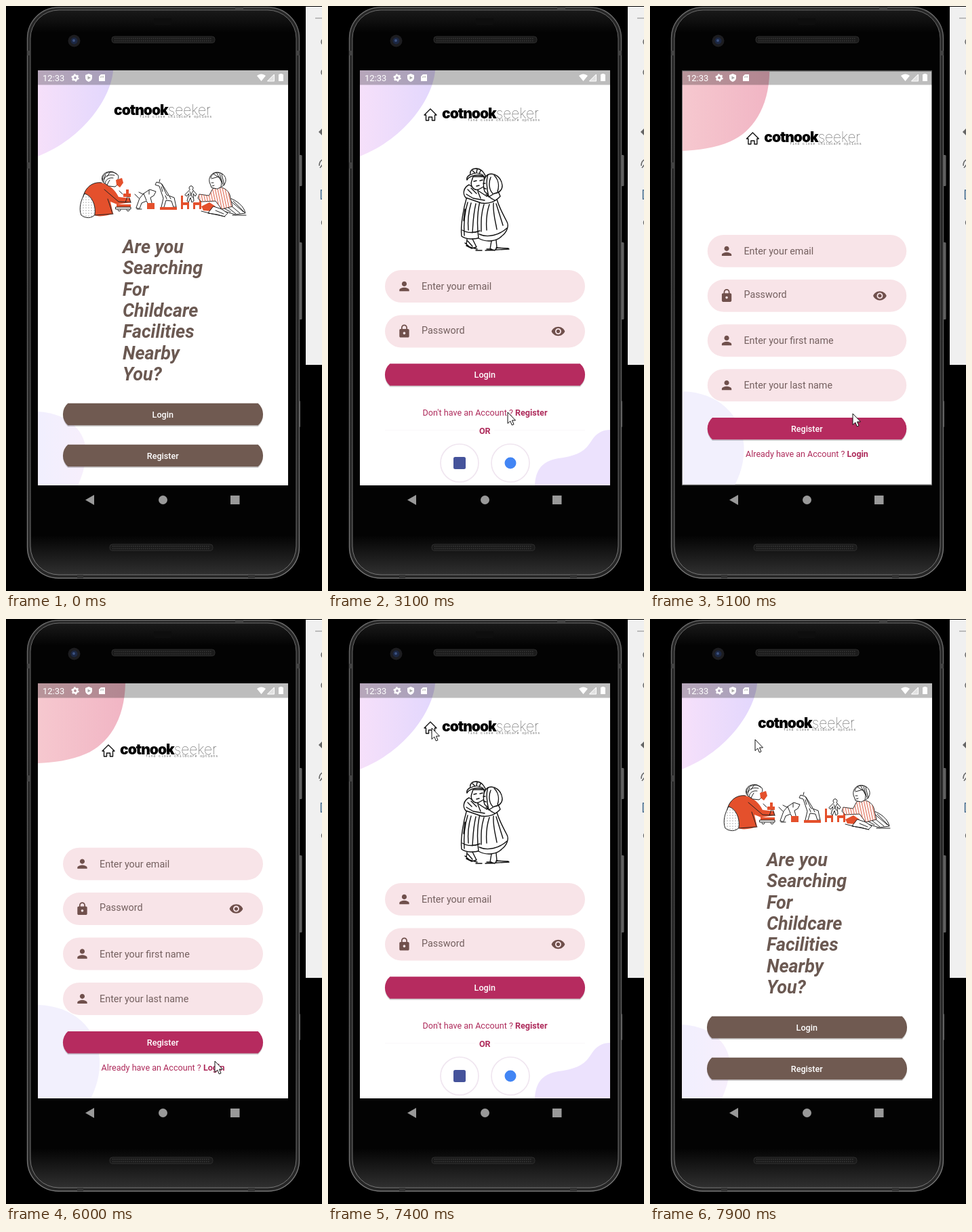
An HTML page that plays this animation: 466x864 px, repeating every 8000 ms.

```html
<!DOCTYPE html>
<html lang="en">
<head>
<meta charset="utf-8">
<title>Childcare app walkthrough</title>
<style>
html, body { margin: 0; width: 100%; height: 100%; overflow: hidden; background: #000; }
svg { display: block; width: 466px; height: 864px; font-family: Roboto, sans-serif; }
.mid { text-anchor: middle; font-size: 12.6px; }
.btn { fill: #fff; font-weight: 500; }
.link { fill: #ae2b5b; }
.hint { font-size: 14.4px; fill: #74605f; }
.icon { fill: #70504c; }
.head { font: italic 700 26.95px Roboto, sans-serif; fill: #6b5952; }
.logo { font: 900 21px Inter, sans-serif; letter-spacing: -1px; }
.logo .thin { font-weight: 100; letter-spacing: 0; fill: #444; }
.tag { font: 5px "Liberation Mono", monospace; letter-spacing: .82px; fill: #666; }
.ink { fill: none; stroke: #222; stroke-linecap: round; stroke-linejoin: round; }
.bold .ink { stroke: #111; stroke-width: 1.4; }
.ink.paper { fill: #fff; }
.red { fill: #e4502c; }
</style>
</head>
<body>
<svg id="stage" viewBox="0 0 466 864"></svg>
<script>
const ICONS = {
  person: 'M12 12c2.21 0 4-1.79 4-4s-1.79-4-4-4-4 1.79-4 4 1.79 4 4 4zm0 2c-2.67 0-8 1.34-8 4v2h16v-2c0-2.66-5.33-4-8-4z',
  lock: 'M18 8h-1V6c0-2.76-2.24-5-5-5S7 3.24 7 6v2H6c-1.1 0-2 .9-2 2v10c0 1.1.9 2 2 2h12c1.1 0 2-.9 2-2V10c0-1.1-.9-2-2-2zm-6 9c-1.1 0-2-.9-2-2s.9-2 2-2 2 .9 2 2-.9 2-2 2zm3.1-9H8.9V6c0-1.71 1.39-3.1 3.1-3.1s3.1 1.39 3.1 3.1v2z',
  eye: 'M12 4.5C7 4.5 2.73 7.61 1 12c1.73 4.39 6 7.5 11 7.5s9.27-3.11 11-7.5c-1.73-4.39-6-7.5-11-7.5zM12 17c-2.76 0-5-2.24-5-5s2.24-5 5-5 5 2.24 5 5-2.24 5-5 5zm0-8c-1.66 0-3 1.34-3 3s1.34 3 3 3 3-1.34 3-3-1.34-3-3-3z'
};

const path = (d, attrs = '') => `<path d="${d}" ${attrs}/>`;
const rect = (x, y, w, h, fill, attrs = '') =>
  `<rect x="${x}" y="${y}" width="${w}" height="${h}" fill="${fill}" ${attrs}/>`;
const circle = (x, y, r, fill, attrs = '') => `<circle cx="${x}" cy="${y}" r="${r}" fill="${fill}" ${attrs}/>`;
const text = (x, y, cls, str) => `<text x="${x}" y="${y}" class="${cls}">${str}</text>`;
const icon = (name, x, y) =>
  path(ICONS[name], `class="icon" transform="translate(${x - 10.8} ${y - 10.8}) scale(.898)"`);

const ink = d => path(d, 'class="ink"');
const shape = d => path(d, 'class="ink paper"');
const red = d => path(d, 'class="red"');
const filled = (d, pattern) => shape(d) + path(d, `fill="url(#${pattern})"`);

// A bar whose ends are arcs of a taller pill
const button = (mid, fill, label) => {
  const bar = (y, attrs) => path(`M91.3 ${y}H371.7A21.5 21.5 0 0 1 371.7 ${y + 32.4}H91.3A21.5 21.5 0 0 1 91.3 ${y}Z`, attrs);
  return bar(mid - 14.4, 'opacity=".2"') + bar(mid - 16.2, `fill="${fill}"`) +
    text(231.3, mid + 4.5, 'mid btn', label);
};

const field = (y, label) => {
  const secret = label === 'Password', mid = y + 24;
  return rect(84, y, 295, 48, '#f8e4e8', 'rx="24"') + icon(secret ? 'lock' : 'person', 112.5, mid) +
    text(138, mid + (secret ? 3 : 5), 'hint', label) + (secret ? icon('eye', 339.5, mid) : '');
};

const logo = (x, y) =>
  text(x, y, 'logo', 'cotnook<tspan class="thin">seeker</tspan>') +
  text(x + 38, y + 3.6, 'tag', 'find close childcare options');

const homeLogo = dy => `<g transform="translate(0 ${dy})">` +
  path('M142 161L151 152L160 161H157.5V169H153.5V164H148.5V169H144.5V161Z',
    'fill="#fff" stroke="#111" stroke-width="1.4" stroke-linejoin="round"') +
  logo(168, 166) + '</g>';

const footer = (y, question, action) =>
  text(231.5, y, 'mid link', `${question} <tspan font-weight="700">${action}</tspan>`);

const lilacCorner = path('M47 95H158C155 135 115 195 47 222Z', 'fill="url(#lilac)"');

// Two children at play with a row of toys
const playing =
  red('M141 261C129 259 117 267 114 281C126 282 131 292 128 308C137 313 150 309 158 307L154 289L164 293L184 290L183 284L166 282C160 270 153 265 141 261Z') +
  filled('M116 277C110 287 107 300 111 309C117 314 127 314 131 308C133 295 127 280 116 277Z', 'dots') +
  ink('M141 261C129 259 117 267 114 281M145 271L166 289L184 290M131 309L158 307M150 285L157 306') +
  shape('M143 260C140 248 150 244 159 246C167 248 167 254 164 257L166 262L161 267L152 266Z') +
  ink('M142 258C139 249 148 243 158 245L164 249M144 260C144 252 150 248 160 250M146 262C147 256 152 253 158 254M149 264L153 257M147 249L144 256M153 246L149 252') +
  red('M162 257L171 254L173 261L168 268L163 264Z') +
  red('M163 293H184V297H163ZM173 277H184V282H173ZM177 271H181V277H177Z') +
  shape('M162 297H184V300H162Z') + ink('M165 301A2 2 0 1 0 169 301M178 301A2 2 0 1 0 182 301M179 282L176 290M181 282L184 290M172 278L167 273') +
  shape('M192 298L197 284L203 277L212 271L221 274L218 280L213 283L217 298H213L207 288L200 291L197 299Z') +
  ink('M190 278L196 284M203 277L207 287M196 275L202 278M211 272V278M193 300H200') +
  red('M208 291H219V300H208Z') +
  shape('M229 297L232 284L226 266L220 264L222 260L229 262L237 279L248 283L251 297H247L244 288L236 287L233 297Z') +
  ink('M226 260L227 256M229 267L231 274M235 280L237 285M241 281L243 285M230 263L240 279') +
  red('M227 297H252V301H227Z') +
  red('M258 280H261V290H270V300H267V294H261V300H258ZM276 290H285V280H288V300H285V294H279V300H276Z') +
  shape('M271 271A3 3 0 1 1 275 271L281 278L279 281L276 277L277 288L274 290L272 283L269 290L267 288L270 277L266 281L264 279Z') +
  ink('M271 274L275 283M276 273L271 281') +
  shape('M328 283C341 287 351 296 353 306L338 308L318 302L314 292Z') +
  ink('M330 287L350 304M327 291L345 306M335 288L352 305M323 294L339 307M334 309H354M320 298L331 304') +
  filled('M305 270C314 265 326 268 330 279L334 296L318 300L309 288L288 289L283 284L285 278L299 280Z', 'stripes') +
  shape('M303 268L300 260C298 250 307 244 314 246C324 248 327 258 321 265L312 270Z') +
  ink('M302 254C303 246 313 243 320 249M303 255L314 252C317 256 319 261 317 266M318 249L322 264M315 248L320 264M311 247L318 260M306 248L315 254M303 261H306M304 266L307 265') +
  red('M288 296L300 290L309 296L304 303L291 302Z') +
  shape('M306 296L318 300L327 306L322 311L312 308L298 306Z') + ink('M299 306L323 311M288 303L300 306M309 302L321 307');

// Two children in bonnets hugging
const hugging = '<g class="bold">' +
  shape('M205 281C200 298 195 324 197 340C204 345 217 345 224 342L226 286Z') +
  shape('M224 288C220 306 220 328 222 343C234 350 250 347 256 340C264 334 267 325 264 319C256 304 251 294 249 285Z') +
  shape('M208 264C200 268 198 277 203 283L226 291C238 293 248 288 254 281L251 274L234 281Z') +
  shape('M212 258C209 266 215 273 222 271L231 266L230 252L214 252Z') +
  shape('M205 257C208 251 222 246 234 254C229 245 227 241 219 240C211 240 209 245 210 249C206 251 204 254 205 257Z') +
  ink('M211 249C216 246 223 246 229 250M213 243L217 247M220 241L219 246M225 243L223 248M215 259L219 258M224 258L228 257M219 266L223 265') +
  shape('M236 249C229 253 228 265 231 274L238 280C236 268 239 260 250 255Z') +
  shape('M236 249C246 245 256 254 257 265C257 273 251 276 245 277L237 282C234 270 233 256 236 249Z') +
  ink('M240 253C236 262 238 272 243 277M245 250C251 256 253 265 250 274M229 262L232 262M230 269L233 270') +
  ink('M204 278L214 284L231 287M233 278L242 285M206 271L212 277M211 269L219 277M221 274L225 284M239 283L246 287') +
  ink('M206 290C201 306 200 323 201 339M211 291C206 308 206 320 207 331M218 292C214 309 214 320 213 335M198 331C206 336 217 335 224 332M202 300L200 317') +
  ink('M230 293C225 310 226 320 226 333M238 293C233 308 233 319 234 331M244 291C243 306 247 318 249 330M248 292L258 324M223 337C236 343 253 338 264 328') +
  ink('M205 344L204 354L212 358L219 356L213 344M241 347L239 359L246 361L249 357L248 346M202 350L209 356L220 359M234 359H241M206 347L213 355M218 361H227M232 361L267 359M248 357L266 358') +
  '</g>';

const landing =
  lilacCorner + path('M47 599C95 602 118 630 118 660C117 680 112 695 106 708H47Z', 'fill="url(#mist)"') +
  logo(159, 161) + playing +
  ['Are you', 'Searching', 'For', 'Childcare', 'Facilities', 'Nearby', 'You?']
    .map((line, i) => text(172, 365 + 31.35 * i, 'head', line)).join('') +
  button(603, '#705a51', 'Login') + button(664, '#705a51', 'Register');

const login =
  lilacCorner +
  path('M305 708C306 690 312 672 340 668C372 664 380 655 388 643C396 630 405 626 416 626V708Z', 'fill="#ece2fd"') +
  homeLogo(0) + hugging + field(390, 'Enter your email') + field(456.5, 'Password') +
  button(544.5, '#b62b5f', 'Login') + footer(605, "Don't have an Account ?", 'Register') +
  rect(84, 626, 134, 1, '#faf8fa') + rect(245, 626, 134, 1, '#faf8fa') +
  text(231.3, 631.5, 'mid link', '<tspan font-weight="700">OR</tspan>') +
  [194, 269].map(x => circle(x, 675, 28, '#fff', 'stroke="#f0e6f0" stroke-width="1.7"')).join('') +
  rect(185, 666, 18, 18, '#45539b', 'rx="2.5"') + circle(269, 675, 8.5, '#4285f4');

const register =
  path('M47 95H176C175 150 150 185 118 199C95 209 70 212 47 213Z', 'fill="url(#rose)"') +
  path('M47 570C100 571 134 605 138 650C139 675 132 694 125 708H47Z', 'fill="#f2f0fd"') +
  homeLogo(34) +
  ['Enter your email', 'Password', 'Enter your first name', 'Enter your last name']
    .map((label, i) => field(337.7 + 66.4 * i, label)).join('') +
  button(625.3, '#b62b5f', 'Register') + footer(667, 'Already have an Account ?', 'Login');

const statusBar =
  rect(47, 95, 369, 21.5, '#000', 'opacity=".26"') +
  `<g fill="#fff"><text x="54" y="111" font-size="13">12:33</text>` +
  circle(102, 106, 3.2, 'none', 'stroke="#fff" stroke-width="2.6"') +
  circle(102, 106, 4.9, 'none', 'stroke="#fff" stroke-width="1.6" stroke-dasharray="2.4 2.73"') +
  path('M122 100L127 102V106C127 109 125 111 122 112C119 111 117 109 117 106V102Z') +
  path('M120.5 103.5L125 106L120.5 108.5Z', 'fill="#aaa"') +
  path('M140 101H146V111H137V104Z') + path('M139.5 104V106M141.5 103V106M143.5 103V106', 'stroke="#bbb"') +
  path('M370 103C374 99.5 379 99.5 383 103L376.5 111Z') +
  path('M395 101V111H385Z', 'opacity=".55"') + path('M395.5 101V111H385.5Z', 'fill="none" stroke="#fff"') +
  path('M403.5 100H407.5V101H409V111H402V101H403.5Z') + '</g>';

const speaker = (x, y, w) => rect(x, y, w, 9.5, '#1b1b1b', 'rx="4" stroke="#2d2d2d"') +
  path(`M${x + 4} ${y + 3}H${x + w - 4}M${x + 4} ${y + 6.5}H${x + w - 4}`, 'stroke="#3a3a3a" stroke-width="1.5" stroke-dasharray="1.5 1.5"');

const phone =
  [[220, 46], [349, 114], [583, 39]].map(([y, h]) => rect(432, y, h === 39 ? 2 : 4.5, h, '#606060', 'rx="1.5"')).join('') +
  rect(31.5, 2, 401, 843, '#262626', 'rx="46" stroke="url(#rim)" stroke-width="1.4"') +
  rect(36, 6, 392, 834, 'url(#body)', 'rx="42" stroke="url(#rim)"') +
  rect(31, 66, 5, 7, '#444') + rect(31, 231, 5, 9, '#444') + rect(428, 66, 5, 7, '#444') +
  rect(338, 1, 12, 5, '#444') + rect(105, 840, 9, 5, '#333') + rect(357, 840, 10, 5, '#333') +
  rect(218, 18, 26, 10, '#0e0e0e', 'rx="2"') +
  circle(100.5, 51.5, 9, '#1d1d20') + circle(100.5, 51.5, 5, '#1c2742') + circle(100, 51, 2, '#3c5280') +
  speaker(156, 45, 152) + speaker(153, 795, 152) +
  `<g fill="#999">${path('M117 729.5L130 722V737Z')}<circle cx="231.5" cy="729.5" r="6.5"/>${rect(331, 723, 13.5, 13, '#999')}</g>`;

const toolbar = rect(442, 1, 24, 529, '#f0f0f0') +
  `<g fill="none" stroke="#666" stroke-width="1.5">` +
  path('M456 18H466', 'stroke="#aaa"') + circle(470, 53, 5, 'none') + circle(470, 98, 5, 'none') +
  path('M467 181L462 186L467 191Z', 'fill="#666"') + path('M462 236C462 231 464 228 467 227M463 239L467 234') +
  rect(464.5, 272, 8, 13, '#c9d8e6', 'stroke="#4a6d8c"') + circle(470, 320, 4.5, 'none') + '</g>';

const gradient = (id, dir, ...stops) => `<linearGradient id="${id}" ${dir}>` +
  stops.map(([offset, color]) => `<stop offset="${offset}" stop-color="${color}"/>`).join('') + '</linearGradient>';
const across = 'x2="1" y2="0"', down = 'x2="0" y2="1"';

document.getElementById('stage').innerHTML = `<defs>
  ${gradient('lilac', across, [0, '#f6e0fa'], [1, '#e2d7fd'])}
  ${gradient('mist', across, [0, '#f1effe'], [1, '#f7effc'])}
  ${gradient('rose', across, [0, '#f6c8cf'], [1, '#f1b5c4'])}
  ${gradient('rim', down, [0, '#6a6a6a'], [.5, '#555'], [1, '#777'])}
  ${gradient('body', down, [0, '#1a1a1a'], [.04, '#030303'], [.93, '#030303'], [1, '#303030'])}
  <pattern id="dots" width="4" height="4" patternUnits="userSpaceOnUse"><circle cx="2" cy="2" r=".6" fill="#555"/></pattern>
  <pattern id="stripes" width="3.6" height="4" patternUnits="userSpaceOnUse" patternTransform="rotate(-12)"><rect width="1.2" height="4" fill="#e0705a"/></pattern>
  <clipPath id="screen"><rect x="47" y="95" width="369" height="613"/></clipPath>
  </defs>${rect(0, 0, 466, 864, '#000')}${phone}${toolbar}
  <g clip-path="url(#screen)">${rect(47, 95, 369, 613, '#666')}
  ${[landing, login, register].map(p => `<g class="page">${rect(47, 95, 369, 613, '#fff')}${p}</g>`).join('')}
  ${statusBar}</g>
  <path id="cursor" d="M0 0V16.5L3.8 13L6.3 19L9 17.8L6.5 12H11.5Z" fill="#fff" stroke="#111" stroke-linejoin="round"/>`;

const pages = document.querySelectorAll('.page');
const cursor = document.getElementById('cursor');
const LOOP = 8000;

// [time, page, scale]: a new page appears and settles to full size
const views = [[0, 0, 1], [3100, 1, 1], [5100, 2, .995], [5200, 2, .998], [5300, 2, 1],
  [6500, 1, .99], [6600, 1, .997], [6800, 1, 1], [7800, 0, .996], [7900, 0, 1]];

// [time, x, y]: the pointer is sampled every 100 ms
const moves = [[0, -40, -40], [100, 394, 548], [200, 318, 549], [400, 305, 558], [500, 291, 568],
  [600, 277, 580], [700, 265, 593], [800, 259, 600], [1000, 265, 600], [3900, 262, 590],
  [4000, 282, 573], [4200, 290, 592], [4300, 295, 608], [4500, 299, 602],
  [5800, 366, 640], [5900, 338, 648], [6000, 308, 653], [6200, 301, 660]];
for (let i = 1; i <= 7; i++) {
  const k = i / 7, ease = k * k * (3 - 2 * k);
  moves.push([6700 + 100 * i, 301 - 148 * ease, 660 - 499 * ease]);
}
moves.push([7800, 155, 178]);

const latest = (list, t) => list.findLast(item => item[0] <= t);
const start = performance.now();

function draw() {
  const t = (performance.now() - start) % LOOP;
  const [, current, scale] = latest(views, t);
  pages.forEach((page, i) => {
    page.style.display = i === current ? '' : 'none';
    page.setAttribute('transform', `translate(231.5 401.5) scale(${scale}) translate(-231.5 -401.5)`);
  });
  const [, x, y] = latest(moves, t);
  cursor.setAttribute('transform', `translate(${x} ${y})`);
  requestAnimationFrame(draw);
}
draw();
</script>
</body>
</html>
```
